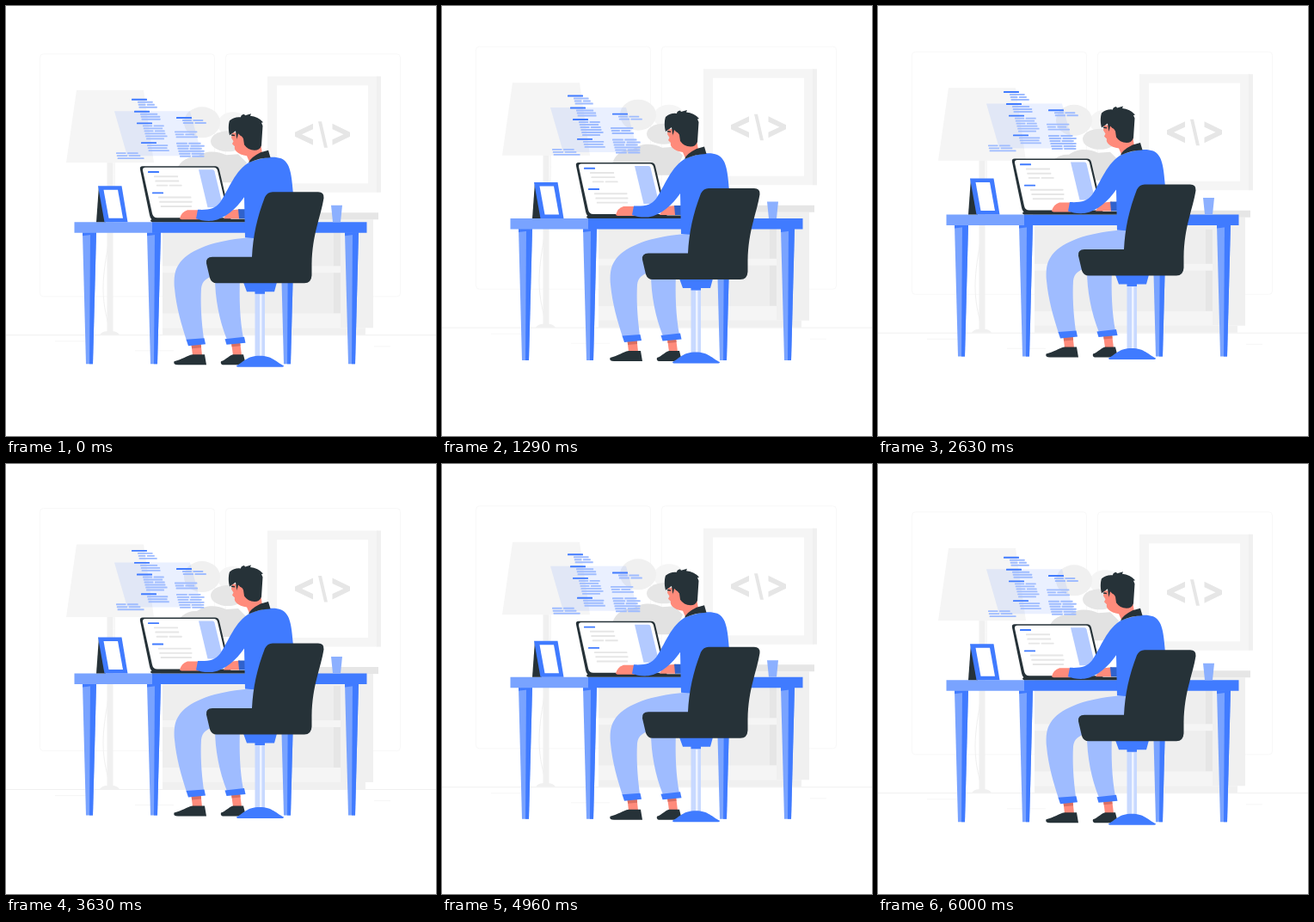
An HTML page for the animation above (6040 ms loop, 500x500 px).

```html
<!DOCTYPE html>
<html lang="en">
<head>
<meta charset="utf-8">
<title>Programmer at a desk</title>
<style>
html, body { margin: 0; width: 100%; height: 100%; overflow: hidden; background: #fff; }
svg { display: block; width: 100%; height: 100%; }
.dark { fill: #263238; }
.blue { fill: #407bff; }
.mid { fill: #79a3ff; }
.pale { fill: #9fbcff; }
.skin { fill: #ff8b7b; }
.shade { fill: #d96f62; }
.g1 { fill: #f5f5f5; }
.g2 { fill: #f0f0f0; }
.g3 { fill: #e6e6e6; }
.line { fill: none; stroke: #f0f0f0; }
</style>
</head>
<body>
<svg viewBox="0 0 500 500">
  <defs>
    <g id="leg">
      <path class="mid" d="M0 263h16l-4 153h-8z"/>
      <path class="blue" d="M9 263h7l-4 153h-4z"/>
      <path class="blue" d="M0 263h16v2l-16 2z"/>
    </g>
  </defs>

  <g id="room">
    <g fill="none" stroke="#f8f8f8">
      <rect x="39.5" y="55.5" width="203" height="282" rx="4"/>
      <rect x="255.5" y="55.5" width="203" height="282" rx="4"/>
    </g>
    <path class="line" d="M0 382.400H500"/>
    <path class="line" stroke-opacity=".6" d="M57 389.500h42M428 395.500h19M150 400.500h45"/>

    <!-- lamp -->
    <path class="g1" d="M82 97.500h78l12 84.500H70z"/>
    <path class="g2" d="M117.500 182h7v196h-7zM109 382q3-4 8-4h7q5 0 8 4z"/>
    <path class="line" d="M126 182C128 255 113 290 113 328C113 350 118 365 121 378"/>

    <!-- framed picture -->
    <path class="g1" d="M304 81.500h128v135H304z"/>
    <path class="g2" d="M431 81.500h5v135h-5z"/>
    <path fill="#fff" d="M315 92h106v114H315z"/>
    <path class="g3" d="M357 136.500v6.500l-13 6 13 6v6.500l-21-10v-5zM379.500 136.500v6.500l13 6-13 6v6.500l20.500-10v-5zM363 134h4l7 30.500h-4z"/>

    <!-- cabinet -->
    <path class="g2" d="M182 248h245v126h-245z"/>
    <path class="g1" d="M182 357h207v17h-207zM182 302h207v8h-207z"/>
    <path fill="#eee" d="M182 262h199v40h-199zM182 310h199v47h-199z"/>
    <path class="g3" d="M180 240h253v8h-253zM381 262h8v40h-8zM381 310h8v47h-8z"/>
    <path class="g2" d="M182 374h236v8h-236z"/>

    <!-- plant -->
    <ellipse class="g1" cx="264" cy="137" rx="18" ry="14"/>
    <ellipse class="g2" cx="228" cy="135" rx="21" ry="18"/>
    <ellipse class="g3" cx="258" cy="157" rx="20" ry="12"/>
    <path fill="#e2e2e2" d="M197 196C199 182 210 174 222 175C232 167 246 168 256 173L270 172L280 182L270 205H200z"/>
  </g>

  <g id="desk">
    <path class="blue" opacity=".11" d="M126 122h88l14 52h-87z"/>
    <g id="code"></g>

    <use href="#leg" x="89"/>
    <use href="#leg" x="164"/>
    <use href="#leg" x="319"/>
    <use href="#leg" x="394"/>
    <path class="mid" d="M79.500 251h91v12.500h-91z"/>
    <path class="blue" d="M170 251h249.500v12.500h-249.500z"/>
    <path fill="#8cb0ff" d="M378 231.500h13l-2 19.500h-9z"/>

    <!-- photo frame -->
    <path class="dark" d="M108 209l8 42h-11z"/>
    <path class="blue" d="M107 209h27.500l7 42h-27z"/>
    <path fill="#fff" d="M113.500 213.500h16.500l6 33h-16.500z"/>

    <!-- laptop -->
    <path class="dark" d="M159 186H243Q247 186 248 190L262 250H174Q168 249 167 243L156 190Q155 186 159 186z"/>
    <path fill="#fff" d="M162 187.500H242Q245 187.500 246 191L259 246H176Q171 246 170 241L159 191Q158.500 187.500 162 187.500z"/>
    <path fill="#b3caff" d="M224 190h16q2 0 2.500 2l10 42h-18z"/>
    <g id="screen"></g>
    <path class="dark" d="M170 247.500h110v3.500h-110q-4-1.500 0-3.500z"/>

    <!-- far leg and far hand -->
    <path class="pale" d="M243 315h29C271 340 272 365 276 386L257 388C248 365 243 340 243 315z"/>
    <path class="skin" d="M262 391l10-1 2 16h-10z"/>
    <path class="shade" d="M262 391l10-1 .6 5-10 1z"/>
    <path class="blue" d="M254.500 387l22.500-2.500 1.500 7-22 2z"/>
    <path class="dark" d="M250 413C256 411 258 407 264 405H276L279 417H252Q249 416 250 413z"/>
    <path class="skin" d="M253 247Q256 240 263 237L272 236V247z"/>
    <path fill="#3062cc" d="M270 236h9v11h-8z"/>

    <!-- near leg -->
    <path class="pale" d="M294 268.500C255 270 225 278 208 292C196 303 195 313 196 328C198 350 204 370 210 389L230 387C227 365 226 345 227 328C228 319 234 316 242 313H300z"/>
    <path class="skin" d="M215.500 393l11-1 1.500 14h-11z"/>
    <path class="shade" d="M215.500 393l11-1 .6 5-11 1z"/>
    <path class="blue" d="M209.500 387.500l21-1.500 1.500 7-20 2z"/>
    <path class="dark" d="M195.500 413C205 411 210 406 217 405H231L233 417H200Q194 417 195.500 413z"/>

    <!-- head -->
    <path class="skin" d="M263 147L262 153L264.500 157L263 160L266 163Q265 166 268 169Q272 173 280 174L283 181L298 171L294 148z"/>
    <path class="dark" d="M260 150C258 142 259 136 260 133Q266 128 273 129Q273 126 277 125.500L278 127L285 125L284 127.500Q293 128 299 135L297 135.500L298.500 139L297 162Q295 167.500 289 167.500Q281 167 277 161L276 154L270 148L268.500 156L267 145z"/>
    <ellipse class="skin" cx="272" cy="156" rx="4" ry="5.500"/>
    <path class="dark" d="M262 149l4 .5v1.500l-4-.5z"/>

    <!-- near hand, sweater and collar -->
    <path class="skin" d="M202 247Q204 239 211 237H224V248H204z"/>
    <path class="blue" d="M284 181C300 175 312 174 320 177C331 182 332 196 334 218L320 272L278 269L277 222C268 235 255 247 240 249.500C232 250 226 249 221 247L223 236.500C235 237 243 236 249 228C259 214 266 190 284 181z"/>
    <path class="dark" d="M282 182Q284 176 296 170L305 167.500L307.500 176Q295 176 282 182z"/>

    <!-- chair -->
    <path fill="#c8d9ff" d="M289.500 330h11.500v78h-11.500z"/>
    <path fill="#eef3ff" d="M295 335h2.500v72h-2.500z"/>
    <path class="blue" d="M276 321h39l-3 11h-32zM289.500 331h11.500v3.500h-11.500z"/>
    <path class="blue" d="M268 418C276 414 280 406.500 295 406.500S314 414 323 418Q323 419.500 320 419.500H271Q268 419.500 268 418z"/>
    <path class="dark" d="M301 222Q304 216 310 216H363Q370 216 369.500 223C366 245 356 265 355.500 300V313Q355 322 347 322H245Q239 322 237 316L233 299Q232 291.500 240 291.500H286C287 268 292 245 301 222z"/>
  </g>
</svg>
<script>
const $ = id => document.getElementById(id);

let seed = 7;
const random = () => (seed = seed * 16807 % 2147483647) / 2147483647;

function dash(id, x, y, width, color) {
  $(id).innerHTML += `<rect x="${x}" y="${y - 0.9}" width="${width}" height="1.9" rx=".5" fill="${color}"/>`;
}

// A block of slanted code rows of varied width; some rows are two words.
function block(id, x, y, rows, width, gap, color) {
  for (let i = 0; i < rows; i++) {
    const left = x + i * gap * 0.27, top = y + i * gap;
    const full = width * (0.88 + 0.24 * random());
    const word = random() < 0.4 ? full * 0.45 : 0;
    if (word) dash(id, left, top, word, color);
    const skip = word && word + 1.5;
    dash(id, left + skip, top, full - skip, color);
  }
}

function titledBlock(id, x, y, rows, width, gap = 3, color = '#9fbcff') {
  dash(id, x, y, gap > 3 ? 13 : 18, '#407bff');
  block(id, x + 7, y + gap, rows, width, gap, color);
}

titledBlock('code', 146, 108.4, 3, 20);
titledBlock('code', 149, 122.4, 3, 21);
titledBlock('code', 152, 136, 6, 23);
titledBlock('code', 157, 158.8, 3, 22);
titledBlock('code', 198, 129.6, 2, 25);
block('code', 128, 170.8, 3, 28, 3, '#9fbcff');
block('code', 196, 146, 3, 25, 3, '#9fbcff');
block('code', 198, 159.4, 6, 29, 3, '#9fbcff');
titledBlock('screen', 165, 192.7, 3, 29, 5.2, '#e6e6e6');
titledBlock('screen', 170, 217, 3, 35, 5.2, '#e6e6e6');

// Straight rise of 10 units and back within one period.
const rest = 0.3;
const bob = (t, period) => rest - 10 * (1 - Math.abs((t % period) / period * 2 - 1));

function draw() {
  const t = Math.min(performance.now() % 6040, 6000);
  $('room').setAttribute('transform', `translate(0 ${bob(t, 3000)})`);
  $('desk').setAttribute('transform', `translate(0 ${bob(t, 6000)})`);
  requestAnimationFrame(draw);
}
draw();
</script>
</body>
</html>
```
